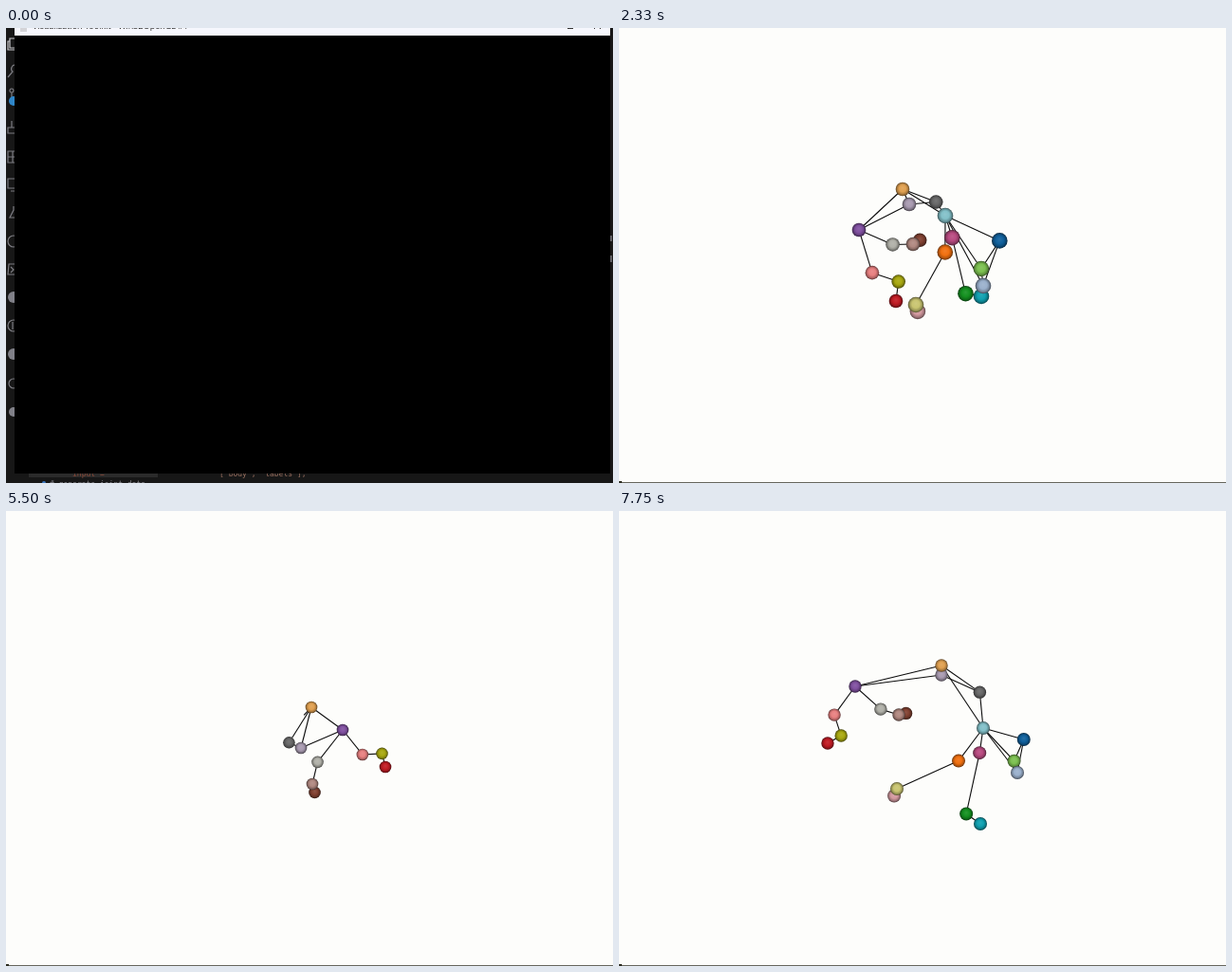
Recreate the animation shown at these times as an HTML page with a canvas. Size 640x480 px, loop 7.83 s.

```html
<!DOCTYPE html>
<html lang="en">
<head>
<meta charset="utf-8">
<title>Skeleton motion</title>
<style>
  html, body { margin: 0; width: 640px; height: 480px; overflow: hidden; background: #fdfdfb; }
  canvas, svg { position: absolute; left: 0; top: 0; display: block; }
  .sans { font: 9px "Open Sans", "Noto Sans", sans-serif; }
  .mono { font: 8px "DejaVu Sans Mono", monospace; }
</style>
</head>
<body>
<canvas id="stage" width="640" height="480"></canvas>
<svg id="desktop" width="640" height="480" viewBox="0 0 640 480">
  <rect width="640" height="480" fill="#171717"/>
  <g fill="none" stroke="#7c7c82" stroke-width="1.2">
    <path stroke="#c8c8cc" d="M4 11h8v10h-8zM4 14h-2v9h7"/>
    <path d="M10 39a4 4 0 0 0-3 7L2 52"/>
    <path d="M6 68v6m0-6a2 2 0 1 0-.1 0"/>
    <path d="M2 105h8v6h-8zM6 105v-7"/>
    <path d="M2 130h10v12h-10zM2 136h10M7 130v12"/>
    <path d="M2 159h10v10h-10zM5 172h6"/>
    <path d="M8 188v4l-4 8h8"/>
    <circle cx="8" cy="225" r="6"/>
    <path d="M3 249h9l-2 11h-8zM5 252l3 3-3 3"/>
    <circle cx="8" cy="314" r="6"/>
    <path d="M7 310v8"/>
    <circle cx="8" cy="375" r="5"/>
  </g>
  <circle cx="8" cy="77" r="5" fill="#2f86c8"/>
  <g fill="#808088">
    <circle cx="8" cy="284" r="6"/>
    <circle cx="8" cy="344" r="6"/>
    <circle cx="8" cy="405" r="5"/>
  </g>
  <rect x="24" y="469" width="136" height="5" fill="#2b2b2b"/>
  <text class="mono" x="70" y="473" fill="#8a4a38">input  =</text>
  <text class="mono" x="225" y="473" fill="#9a7060">['body', 'labels'],</text>
  <circle cx="40" cy="480" r="2" fill="#3a78c0"/>
  <text class="mono" x="46" y="484" fill="#84848a"># generate joint data</text>
  <path d="M638 219v6M638 240v7" stroke="#7c7c82" stroke-width="1.5"/>
  <rect x="9" y="0" width="628" height="8" fill="#f6f7fd"/>
  <rect x="15" y="0" width="7" height="4" fill="#d4d4d8"/>
  <text class="sans" x="28" y="1" fill="#222">Visualization Toolkit - Win32OpenGL #1</text>
  <path d="M592 .5h6M620 1l2-2m3 0l2 2" stroke="#333" fill="none"/>
  <rect x="9" y="8" width="628" height="462"/>
</svg>
<script>
const ctx = document.getElementById('stage').getContext('2d');
const desktop = document.getElementById('desktop');
const LOOP = 7830, FPS = 12;

// Joint colours, listed back to front.
const colors = {
  J: '#10a0b0', I: '#149020', H: '#b84a80', A: '#10609c', B: '#7cc050', C: '#9ab0cc',
  G: '#d49aa0', F: '#c8c470', E: '#f07010', D: '#82c0c8', L: '#686868', M: '#a89ab0',
  K: '#e0a050', T: '#804030', S: '#b08880', R: '#b0b0a8', N: '#8050a0', Q: '#c01c24',
  P: '#a8a810', O: '#e88080'
};
const bones = ('DA DB DC AB AC BC DE EF FG DH HI IJ KD LD KM KL LM KN MN ' +
  'NO OP PQ NR RS ST').split(' ');

// Joints carried by a limb: root, lead joint, share along and across that line.
const limbs = {
  A: ['D', 'C', .6, -.45], B: ['D', 'C', .8, -.08],
  E: ['D', 'F', .37, -.12], G: ['D', 'F', 1.06, -.04],
  H: ['D', 'J', .26, .03], I: ['D', 'J', .9, .15],
  O: ['N', 'Q', .55, .1], P: ['N', 'Q', .8, -.14],
  R: ['N', 'S', .65, .1], T: ['N', 'S', 1.1, -.1]
};

// Lead joints: neck D, croup K, loin M, hip N, head C, forelegs F and J, hind legs Q and S.
// A third value is the distance in front of the far clipping plane.
function pose(fore, hind, points) {
  const leads = {};
  for (const name of 'DKMNCFJQS') {
    const [x, y, d = 40] = points[name] || [...points.D.slice(0, 2), -40];
    leads[name] = { x, y, d, r: 'KMNQS'.includes(name) ? hind : fore };
  }
  return leads;
}

const side = pose(6.6, 7.3, {
  D: [344, 212], K: [332, 199], M: [274, 213], N: [292, 239], C: [410, 193],
  F: [362, 282], J: [311, 264], Q: [322, 309], S: [253, 254] });
const facing = pose(8.3, 7.3, {
  D: [344, 198], K: [299, 170], M: [306, 186], N: [253, 213], C: [384, 272],
  F: [313, 292], J: [382, 283], Q: [292, 288], S: [310, 228] });
const near = pose(8, 9.6, {
  D: [357, 198], K: [331, 197], M: [264, 211], N: [260, 239], C: [442, 174],
  F: [378, 291], J: [328, 253], Q: [268, 358], S: [246, 265] });
const far = pose(6, 6.3, {
  D: [308, 222, -7], K: [322, 207, 9], M: [311, 250, 14], N: [355, 231],
  Q: [400, 270], S: [323, 288] });
const turn = pose(6.4, 6.4, {
  D: [315, 197], K: [288, 239], M: [264, 248], N: [286, 290], C: [408, 194],
  F: [366, 242], J: [346, 212], Q: [337, 298], S: [278, 263] });
const leap = pose(7, 6.7, {
  D: [384, 229], K: [340, 163], M: [340, 173], N: [249, 185], C: [420, 276],
  F: [293, 293], J: [381, 330], Q: [220, 245], S: [295, 215] });

function zoom(leads, kx, ky, cx, cy) {
  const out = {};
  for (const [name, p] of Object.entries(leads)) {
    out[name] = { x: cx + (p.x - cx) * kx, y: cy + (p.y - cy) * ky, r: p.r * Math.sqrt(ky), d: p.d };
  }
  return out;
}

// [step, pose]
const keys = [
  [1, zoom(side, .95, .95, 330, 240)],
  [17, side],
  [21, zoom(side, 1.38, 1.38, 330, 272)],
  [28, facing],
  [36, zoom(facing, 1.12, 1.12, 335, 242)],
  [45, zoom(near, 1.5, 1.12, 307, 327)],
  [49, near],
  [51, zoom(near, .87, .87, 335, 235)],
  [60, zoom(far, 1.1, 1.1, 350, 250)],
  [66, far],
  [86, turn],
  [93, leap]
];

// Smooth curve through unevenly spaced keys.
function blend(k, step, name, prop) {
  const at = n => keys[Math.max(0, Math.min(keys.length - 1, n))];
  const [a, b, c, d] = [at(k - 1), at(k), at(k + 1), at(k + 2)];
  const v = key => key[1][name][prop];
  const span = c[0] - b[0], u = (step - b[0]) / span;
  const m0 = (v(c) - v(a)) / (c[0] - a[0]) * span;
  const m1 = (v(d) - v(b)) / (d[0] - b[0]) * span;
  const u2 = u * u, u3 = u2 * u;
  return (2 * u3 - 3 * u2 + 1) * v(b) + (u3 - 2 * u2 + u) * m0 +
    (3 * u2 - 2 * u3) * v(c) + (u3 - u2) * m1;
}

function jointsAt(step) {
  let k = 0;
  while (k < keys.length - 2 && step >= keys[k + 1][0]) k++;
  const js = {};
  for (const name in side) {
    js[name] = {};
    for (const prop of ['x', 'y', 'r', 'd']) js[name][prop] = blend(k, step, name, prop);
  }
  for (const [name, [root, lead, along, across]] of Object.entries(limbs)) {
    const a = js[root], b = js[lead], dx = b.x - a.x, dy = b.y - a.y;
    js[name] = {
      x: a.x + dx * along - dy * across,
      y: a.y + dy * along + dx * across,
      d: a.d + (b.d - a.d) * along,
      r: b.r
    };
  }
  const back = prop => .38 * js.D[prop] + .88 * js.M[prop] - .26 * js.N[prop];
  js.L = { x: back('x'), y: back('y'), d: back('d'), r: js.M.r };
  return js;
}

function drawBone(a, b) {
  if (a.d < b.d) [a, b] = [b, a];
  if (a.d <= 0) return;
  const f = b.d < 0 ? a.d / (a.d - b.d) : 1;
  ctx.beginPath();
  ctx.moveTo(a.x, a.y);
  ctx.lineTo(a.x + (b.x - a.x) * f, a.y + (b.y - a.y) * f);
  ctx.stroke();
}

function mix(hex, to, f) {
  const part = n => {
    const c = parseInt(hex.slice(n, n + 2), 16);
    return Math.round(c + (to - c) * f);
  };
  return `rgb(${part(1)},${part(3)},${part(5)})`;
}

function drawBall({ x, y, r, d }, color) {
  if (d <= -r) return;
  const size = d < 0 ? Math.sqrt(r * r - d * d) : r;
  const g = ctx.createRadialGradient(x, y - r * .2, 0, x, y, r);
  g.addColorStop(0, mix(color, 255, .1));
  g.addColorStop(.5, color);
  g.addColorStop(.8, mix(color, 0, .25));
  g.addColorStop(1, mix(color, 0, .6));
  ctx.fillStyle = g;
  ctx.beginPath();
  ctx.arc(x, y, size, 0, 7);
  ctx.fill();
}

function draw(step) {
  desktop.style.visibility = step < 1 ? 'visible' : 'hidden';
  if (step < 1) return;
  ctx.fillStyle = '#fdfdfb';
  ctx.fillRect(0, 0, 640, 480);
  ctx.fillStyle = '#66665c';
  ctx.fillRect(0, 479, 640, 1);
  ctx.fillStyle = '#2c2c20';
  ctx.fillRect(0, 478, 3, 2);
  const js = jointsAt(step);
  ctx.strokeStyle = '#0c0c0c';
  ctx.lineWidth = 1.1;
  for (const [a, b] of bones) drawBone(js[a], js[b]);
  for (const name in colors) drawBall(js[name], colors[name]);
}

const start = performance.now();
let shown = -1;
function tick() {
  const t = (performance.now() - start) % LOOP;
  const step = Math.min(93, Math.floor(t * FPS / 1000 + .05));
  if (step !== shown) draw(shown = step);
  requestAnimationFrame(tick);
}
tick();
</script>
</body>
</html>
```
